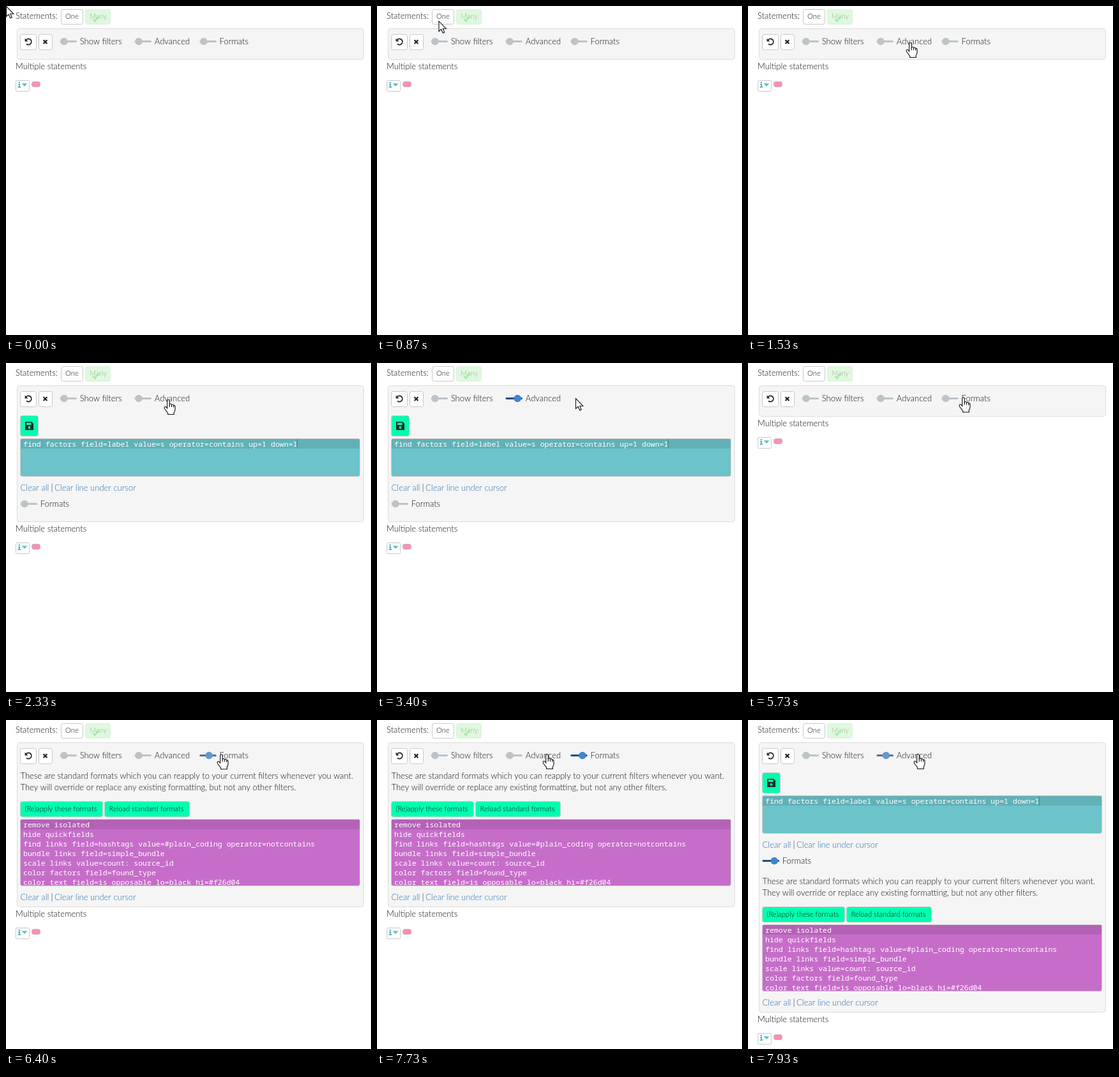
An HTML page with a canvas for the animation above (8000 ms loop, 572 by 515 pixels).

```html
<!DOCTYPE html>
<html lang="en">
<head>
<meta charset="utf-8">
<title>Statement filters</title>
<style>
html, body { margin: 0; width: 100%; height: 100%; overflow: hidden; background: #fff; }
canvas { display: block; width: 572px; height: 515px; }
</style>
</head>
<body>
<canvas id="stage" width="572" height="515"></canvas>
<script>
const ctx = document.getElementById('stage').getContext('2d');
const LOOP = 8000;
const SANS = '300 13px Lato, sans-serif';
const SMALL = '300 11.2px Lato, sans-serif';
const MONO = '500 11.55px "Noto Sans Mono", "DejaVu Sans Mono", monospace';
const INK = '#111418', LINK = '#2a6fb0', BORDER = '#c8c8c8', MINT = '#00ffb0', TEAL = '#5bbdc2';

const QUERY = 'find factors field=label value=s operator=contains up=1 down=1';
const FORMATS = [
  'remove isolated',
  'hide quickfields',
  'find links field=hashtags value=#plain_coding operator=notcontains',
  'bundle links field=simple_bundle',
  'scale links value=count: source_id',
  'color factors field=found_type',
  'color text field=is_opposable lo=black hi=#f26d04'
];

// Pointer track: time, x, y of the hot spot
const TRACK = [
  [533, 0, 0], [800, 70, 16], [1067, 176, 45], [1267, 246, 61], [1333, 254, 61],
  [1400, 254.5, 59], [1467, 254.5, 58], [1533, 254.5, 57],
  [3067, 254.5, 57], [3200, 282, 55], [3333, 308, 54], [3400, 311, 55],
  [3800, 311, 55], [3933, 270, 62], [4067, 215, 72], [4133, 205, 73],
  [4200, 205, 73], [4400, 222, 69], [4600, 244, 63], [4733, 249.5, 61],
  [5267, 249.5, 61], [5400, 277, 55], [5600, 328, 47], [5733, 337.5, 53.5],
  [6933, 337.5, 53.5], [7067, 313, 54], [7200, 280, 54], [7333, 266.5, 53]
];

const ARROW = new Path2D('M.5 .5V16.5L4.1 13.2L6.8 19L9.3 17.9L6.8 12.2H11.8Z');
const HAND = new Path2D('M-1.8 14V2Q-1.8 .5 0 .5T1.8 2V7.6Q3.6 6.2 5 8.3Q7 7.2 8.2 9.4Q10.3 8.8 10.5 11.2V15.5Q10.5 18 8.8 20V23.5H-.8V21.5L-5.8 14.8Q-7 12.6 -5.8 11.6Q-4.6 10.8 -3.3 12.2Z');
const KNUCKLES = new Path2D('M1.8 7.5V12M5 8.5V12M8.2 9.5V12.5');

const clamp = v => Math.max(0, Math.min(1, v));
const mix = (a, b, p) => a + (b - a) * p;
const mixRgb = (a, b, p) => `rgb(${a.map((v, i) => Math.round(mix(v, b[i], p)))})`;

// CSS "ease" curve
function ease(x) {
  x = clamp(x);
  if (x === 0 || x === 1) return x;
  const bez = (a, b, s) => 3 * a * s * (1 - s) ** 2 + 3 * b * s * s * (1 - s) + s ** 3;
  let lo = 0, hi = 1;
  for (let i = 0; i < 20; i++) {
    const mid = (lo + hi) / 2;
    if (bez(0.25, 0.25, mid) < x) lo = mid; else hi = mid;
  }
  return bez(0.1, 1, lo);
}

function text(str, x, y, color = INK, font = SANS) {
  ctx.font = font;
  ctx.fillStyle = color;
  ctx.fillText(str, x, y);
}

function box(x, y, w, h, fill, stroke = BORDER, r = 3) {
  ctx.beginPath();
  ctx.roundRect(x + 0.5, y + 0.5, w - 1, h - 1, r);
  ctx.fillStyle = fill;
  ctx.fill();
  ctx.strokeStyle = stroke;
  ctx.lineWidth = 1;
  ctx.stroke();
}

function line(color, width, ...pts) {
  ctx.beginPath();
  pts.forEach(([x, y]) => ctx.lineTo(x, y));
  ctx.strokeStyle = color;
  ctx.lineWidth = width;
  ctx.stroke();
}

function poly(color, ...pts) {
  ctx.beginPath();
  pts.forEach(([x, y]) => ctx.lineTo(x, y));
  ctx.fillStyle = color;
  ctx.fill();
}

function toggle(label, x, y, p) {
  const off = [189, 195, 199];
  ctx.beginPath();
  ctx.roundRect(x, y - 1.5, 26.5, 3, 1.5);
  ctx.fillStyle = mixRgb(off, [28, 76, 128], p);
  ctx.fill();
  ctx.beginPath();
  ctx.arc(x + mix(6.5, 18.7, p), y, 5.8, 0, 7);
  ctx.fillStyle = mixRgb(off, [62, 134, 205], p);
  ctx.fill();
  text(label, x + 31.3, y + 4.5);
}

function links(y) {
  text('Clear all', 22.5, y, LINK);
  text('|', 70.5, y);
  text('Clear line under cursor', 76, y, LINK);
}

function editor(y, h, fill, active, lines) {
  box(22, y, 533, h, fill);
  ctx.save();
  ctx.beginPath();
  ctx.rect(23, y + 1, 531, h - 2);
  ctx.clip();
  ctx.fillStyle = active;
  ctx.fillRect(23, y + 1, 531, 15);
  lines.forEach((s, i) => text(s, 27, y + 13 + 15 * i, '#fff', MONO));
  ctx.restore();
}

function header() {
  text('Statements:', 15, 20);
  box(86, 5, 35, 24, '#fff');
  text('One', 93, 20, INK, SMALL);
  box(124, 5, 40, 24, '#dff8df', '#daf3da');
  text('Many', 131, 20, '#9fb09f', SMALL);
  line('#98ee98', 2, [136.5, 20.5], [139.5, 24], [144.5, 16.5]);
}

function tools() {
  box(22, 44, 26, 25, '#fff');
  ctx.beginPath();
  ctx.arc(35.2, 56, 4.6, -2.5, 2.3);
  ctx.strokeStyle = '#222';
  ctx.lineWidth = 1.8;
  ctx.stroke();
  poly('#222', [29.6, 50.6], [29.6, 55.4], [34.4, 55.4]);
  box(51, 44, 22, 25, '#fff');
  line('#222', 2.2, [58.6, 53.2], [64.4, 59]);
  line('#222', 2.2, [64.4, 53.2], [58.6, 59]);
}

function advancedPane() {
  box(22, 82, 29, 33, MINT);
  poly('#1d2b28', [30, 92], [40, 92], [43, 95], [43, 105], [30, 105]);
  ctx.fillStyle = MINT;
  ctx.fillRect(32, 93.5, 7.5, 3.5);
  ctx.beginPath();
  ctx.arc(36.5, 101, 2, 0, 7);
  ctx.fill();
  editor(118, 60, '#6cc3c9', '#62b1b7', [QUERY]);
  line('#47878b', 1, [456.5, 119], [456.5, 134]);
  links(200);
}

function formatsPane() {
  text('These are standard formats which you can reapply to your current filters whenever you want.', 22.5, 92);
  text('They will override or replace any existing formatting, but not any other filters.', 22.5, 110);
  box(22, 127, 130, 25, MINT);
  text('(Re)apply these formats', 29.5, 143, INK, SMALL);
  box(154, 127, 134, 25, MINT);
  text('Reload standard formats', 161.5, 143, INK, SMALL);
  editor(155, 105, '#c66dc9', '#b362b6', FORMATS);
  links(282);
}

function footer() {
  text('Multiple statements', 15, 99);
  box(15, 116, 22, 18, '#fff', BORDER, 2);
  ctx.fillStyle = TEAL;
  ctx.fillRect(19, 122, 3, 2);
  ctx.fillRect(20, 122, 2, 5);
  ctx.fillRect(18.5, 126, 4.5, 2);
  ctx.fillRect(19.5, 118.8, 2.5, 2.3);
  poly(TEAL, [24.5, 121.3], [33.5, 121.3], [29, 125.8]);
  box(40, 118, 14, 9, '#fb8fb2', '#c9b3bb', 3);
}

function pointer(t, advOpen) {
  let i = TRACK.findIndex(k => k[0] > t);
  if (i < 0) i = TRACK.length;
  const a = TRACK[Math.max(0, i - 1)], b = TRACK[Math.min(i, TRACK.length - 1)];
  const p = b[0] > a[0] ? clamp((t - a[0]) / (b[0] - a[0])) : 0;
  const x = mix(a[1], b[1], p), y = mix(a[2], b[2], p);
  const over = y > 46 && y < 65 && ((x > 201 && x < 288) || (!advOpen && x > 303 && x < 381));
  const shape = over ? HAND : ARROW;
  ctx.save();
  ctx.translate(x, y);
  ctx.fillStyle = '#fff';
  ctx.fill(shape);
  ctx.strokeStyle = '#0c0c14';
  ctx.lineWidth = 1.1;
  ctx.stroke(shape);
  if (over) ctx.stroke(KNUCKLES);
  ctx.restore();
}

function draw(t) {
  const advOpen = (t >= 2333 && t < 5133) || t >= 7799;
  const fmtOpen = t >= 6199;
  const adv = ease((t - 2333) / 500) - ease((t - 5133) / 500) + ease((t - 7733) / 500);
  const fmt = ease((t - 6200) / 500);
  const advShift = advOpen ? 165 : 0;
  const shift = advShift + (fmtOpen ? 209 : 0);

  ctx.fillStyle = '#fff';
  ctx.fillRect(0, 0, 572, 515);
  header();
  box(17, 35, 544, 49 + shift, '#f5f5f5', '#dcdcdc', 4);
  tools();
  toggle('Show filters', 84.5, 55.5, 0);
  toggle('Advanced', 201.5, 55.5, adv);
  if (advOpen) advancedPane();
  toggle('Formats', advOpen ? 22.5 : 303.3, 55.5 + advShift, fmt);
  if (fmtOpen) {
    ctx.save();
    ctx.translate(0, advShift);
    formatsPane();
    ctx.restore();
  }
  ctx.save();
  ctx.translate(0, shift);
  footer();
  ctx.restore();
  pointer(t, advOpen);
}

// The screen refreshes 15 times a second
function tick() {
  const step = Math.floor(((performance.now() % LOOP) + 5) * 3 / 200) % 120;
  draw(step * 200 / 3);
  requestAnimationFrame(tick);
}
tick();
</script>
</body>
</html>
```
